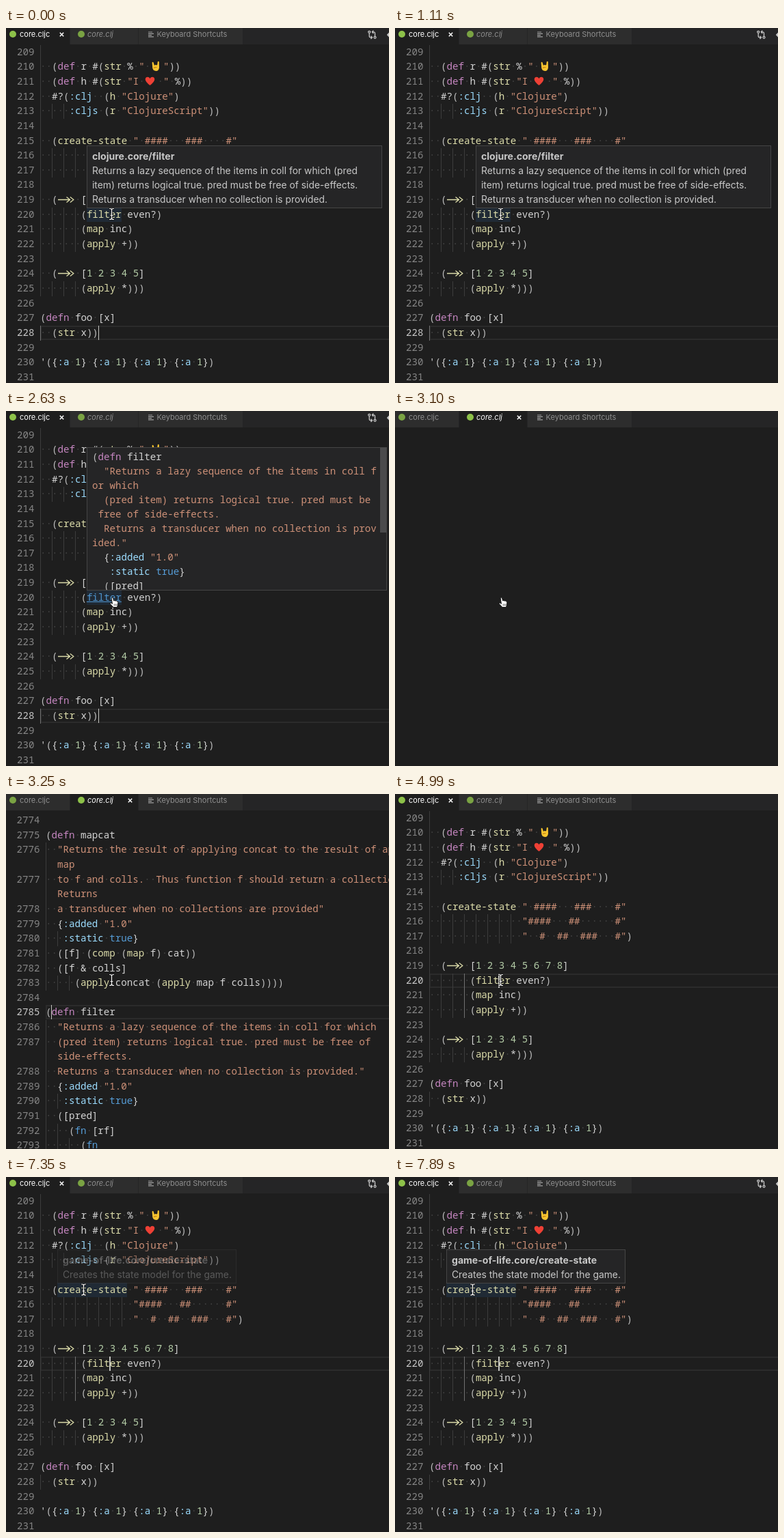
An HTML page for the animation above (8000 ms loop, 560x520 px).

```html
<!DOCTYPE html>
<html lang="en">
<head>
<meta charset="utf-8">
<title>Editor hover and go to definition</title>
<style>
html, body { margin: 0; width: 100%; height: 100%; overflow: hidden; background: #1e1e1e; }
#stage { position: relative; width: 560px; height: 520px; overflow: hidden; background: #1e1e1e; color: #d4d4d4; }
#stage div, #stage svg.abs { position: absolute; box-sizing: border-box; }
.row, .num, .src { white-space: pre; font: 14.15px/21.65px "Noto Sans Mono", monospace; font-variant-ligatures: none; }
.row, .num { height: 21.65px; margin-top: -1px; }
.num { color: #858585; }
.num.on { color: #c6c6c6; }
.row i { font-style: normal; color: #424242; }
.s { color: #ce9178; } .k { color: #9cdcfe; } .d { color: #c586c0; } .f { color: #dcdcaa; }
.n { color: #b5cea8; } .b { color: #569cd6; } .p { color: #bcbcbc; }
.link { color: #4e94ce; text-decoration: underline; }
.guide { width: 1px; height: 21.7px; background: #3c3c3c; }
.guide.on { background: #707070; }
.line { right: -4px; height: 21px; border: 2px solid #2b2b2b; }
.caret { width: 1.2px; height: 21px; background: #c4c4c0; }
.word { height: 21px; background: #202a35; }
.tabs { left: 0; top: 0; width: 560px; height: 24px; background: #252526; }
.tab { top: 0; height: 24px; background: #2d2d2d; color: #8f8f8f; font: 11px/19px Inter, sans-serif; white-space: pre; }
.tab.on { background: #1e1e1e; color: #fff; }
.tab span { position: absolute; left: 20px; top: 0; }
.dot { left: 5px; top: 4px; width: 10px; height: 10px; border-radius: 50%; background: #8dc149; opacity: .8; }
.on .dot { opacity: 1; }
.close { display: none; top: 5.5px; }
.on .close { display: block; }
.tip { overflow: hidden; background: #252526; border: 1px solid #454545; color: #c8c8c8; padding: 4px 7px; font: 13.85px/21px Inter, sans-serif; white-space: pre; }
.tip b { font-size: 14.05px; }
.src { line-height: 21px; color: #d4d4d4; left: 7px; top: 2px; }
.bar { right: 0; top: 0; width: 9px; height: 124px; background: #4b4b4c; }
</style>
</head>
<body>
<div id="stage"></div>
<script>
const CH = 8.49, ROW = 21.65, LOOP = 8000;
const stage = document.getElementById('stage');

const mainSource = `
  (def r #(str % " 🤘"))
  (def h #(str "I ❤ " %))
  #?(:clj  (h "Clojure")
     :cljs (r "ClojureScript"))

  (create-state " ####   ###    #"
                "####   ##      #"
                "  #  ##  ###   #")

  (->> [1 2 3 4 5 6 7 8]
       (filter even?)
       (map inc)
       (apply +))

  (->> [1 2 3 4 5]
       (apply *)))

(defn foo [x]
  (str x))

'({:a 1} {:a 1} {:a 1} {:a 1})
`;

// "~" is the unmarked indent of a soft-wrapped line
const coreSource = `
(defn mapcat
  "Returns the result of applying concat to the result of applying
~~map
  to f and colls.  Thus function f should return a collection.
~~Returns
  a transducer when no collections are provided"
  {:added "1.0"
   :static true}
  ([f] (comp (map f) cat))
  ([f & colls]
     (apply concat (apply map f colls))))

(defn filter
  "Returns a lazy sequence of the items in coll for which
  (pred item) returns logical true. pred must be free of
~~side-effects.
  Returns a transducer when no collection is provided."
  {:added "1.0"
   :static true}
  ([pred]
    (fn [rf]
      (fn`;

const peekSource = `(defn filter
  "Returns a lazy sequence of the items in coll f
or which
  (pred item) returns logical true. pred must be
 free of side-effects.
  Returns a transducer when no collection is prov
ided."
  {:added "1.0"
   :static true}
  ([pred]`;

const inlineSvg = (w, body) =>
  `<svg width="${w}" height="16" viewBox="0 0 ${w} 16" style="vertical-align:-3px">${body}</svg>`;
const glyphs = {
  '->>': inlineSvg(3 * CH, '<path d="M1 8.5H18M13.5 4.500l5 4-5 4M18.800 4.500l5 4-5 4" fill="none" stroke="#dcdcaa" stroke-width="1.3"/>'),
  '🤘': inlineSvg(18.7, '<path d="M2.6 2.4q1-1.4 2 0L6 7l1.3-1.2 1.5.6 1.4-.4.6-4.6q1-1.5 2 0l.2 8.5q-.6 5-4.6 5-4.6 0-5.2-4.6z" fill="#f7c52f"/><path d="M5 10.2l4.5-.7" stroke="#b97b16" stroke-width="1.2"/>'),
  '❤': inlineSvg(18.7, '<path d="M7.5 14Q.7 8.7.7 5.2.8 1.9 4 1.7q2.4 0 3.5 2.4Q8.6 1.7 11 1.7q3.2.2 3.3 3.5 0 3.5-6.8 8.8z" fill="#ee4035"/>')
};

const TOKEN = /("[^"]*")|(:\w+)|(\()([a-z][\w-]*|->>)?|(\))|\b(\d+)\b|\b(true)\b/g;

function paint(cls, text) {
  return text.split('\n').map(part => part && `<span class="${cls}">${part}</span>`).join('\n');
}

function highlight(text) {
  return text.replace(TOKEN, (all, str, key, open, head, close, num, bool) => {
    if (str) return paint('s', str);
    if (key) return paint('k', key);
    if (num) return paint('n', num);
    if (bool) return paint('b', bool);
    if (close) return paint('p', close);
    const cls = /^defn?$/.test(head) ? 'd' : head === 'fn' ? 'b' : 'f';
    return paint('p', open) + (head ? paint(cls, head) : '');
  });
}

const showSpaces = html => html.replace(/<[^>]*>|->>|🤘|❤| /gu, m => m === ' ' ? '<i>·</i>' : glyphs[m] || m);

function add(parent, cls, style = {}, html = '') {
  const el = document.createElement('div');
  el.className = cls;
  for (const [k, v] of Object.entries(style)) el.style[k] = typeof v === 'number' ? v + 'px' : v;
  el.innerHTML = html;
  parent.append(el);
  return el;
}

// Blank lines keep only the guides shared by both neighbours
function guideCount(lines, i) {
  const indent = line => line.search(/[^ \u00a0]/);
  if (lines[i]) return Math.ceil(indent(lines[i]) / 2);
  const above = i ? indent(lines[i - 1]) : 2;
  const below = lines[i + 1] ? indent(lines[i + 1]) : 0;
  return Math.ceil(Math.min(above, below) / 2);
}

function makeEditor(source, first, left, top) {
  const text = source.replaceAll('~', '\u00a0');
  const lines = text.split('\n'), html = highlight(text).split('\n');
  const el = add(stage, 'editor', { left: 0, top: 0, width: 560, height: 520 });
  const y = row => top + row * ROW;
  const line = add(el, 'line', { left });
  const word = add(el, 'word');
  const nums = [], guides = [];
  let number = first;
  lines.forEach((raw, row) => {
    for (let g = 0; g < guideCount(lines, row); g++)
      guides.push({ row, g, el: add(el, 'guide', { left: left + g * 2 * CH, top: y(row) }) });
    if (!raw.startsWith('\u00a0')) {
      const digits = String(number++);
      nums[row] = add(el, 'num', { left: left - (digits.length + 1) * CH, top: y(row) }, digits);
    }
    add(el, 'row', { left, top: y(row) }, showSpaces(html[row]));
  });
  const caret = add(el, 'caret');
  return {
    el,
    find: name => [...el.querySelectorAll('span')].find(s => s.textContent === name),
    setCaret(row, col, visible) {
      line.style.top = caret.style.top = y(row) + 'px';
      caret.style.left = left - 0.4 + col * CH + 'px';
      show(caret, visible);
      nums.forEach((n, i) => n.classList.toggle('on', i === row));
    },
    setGuide(from, to, level) {
      guides.forEach(q => q.el.classList.toggle('on', q.row >= from && q.row <= to && q.g === level));
    },
    setWord(row, col, length) {
      Object.assign(word.style, { top: y(row) + 'px', left: left + col * CH + 'px', width: length * CH + 'px' });
    }
  };
}

const show = (el, on) => { el.style.display = on ? '' : 'none'; };
const inside = (t, spans) => spans.some(([a, b]) => t >= a && t < b);
const stepped = (t, steps) => steps.reduce((value, [at, v]) => t >= at ? v : value, 0);

const main = makeEditor(mainSource, 209, 50, 24.6);
const core = makeEditor(coreSource, 2774, 58, 28);
core.setCaret(13, 1, true);
const link = main.find('filter');

// Tab bar
const bar = add(stage, 'tabs');
const cross = x => `<svg class="abs close" style="left:${x}px" width="7" height="7"><path d="M.8.8l5.4 5.4M6.2.8L.8 6.2" stroke="#fff" stroke-width="1.5"/></svg>`;
const tabMain = add(bar, 'tab', { left: 0, width: 93 }, `<div class="dot"></div><span>core.cljc</span>${cross(78)}`);
const tabCore = add(bar, 'tab', { left: 94, width: 99 }, `<div class="dot" style="left:11px"></div><span style="left:25px;font-style:italic">core.clj</span>${cross(84)}`);
add(bar, 'tab', { left: 194, width: 152 },
  '<svg class="abs" style="left:14px;top:5px" width="9" height="9"><path d="M0 1h6M0 3.3h8M0 5.6h5M0 7.9h8" stroke="#a0a0a0" stroke-width="1.2"/></svg><span style="left:26.5px">Keyboard Shortcuts</span>');
const actions = add(bar, 'actions', { left: 528, top: 3, width: 32, height: 14 },
  `<svg class="abs" width="32" height="14" fill="none" stroke="#c8c8c8" stroke-width="1.3">
   <circle cx="3.2" cy="2.8" r="1.5"/><circle cx="11.5" cy="10.8" r="1.5"/>
   <path d="M3.2 4.5v4.3q0 2 2 2h1.6M5.5 8.6l2 2.2-2 2.2M11.5 9V4.8q0-2-2-2H8M9.3.6l-2 2.2 2 2.2"/>
   <path d="M32 3.5L28.8 7 32 10.5z" fill="#c8c8c8" stroke="none"/></svg>`);

// Hover tips
const docTip = add(stage, 'tip', { left: 118, top: 172, width: 432, height: 92 },
  `<b>clojure.core/filter</b>
Returns a lazy sequence of the items in coll for which (pred
item) returns logical true. pred must be free of side-effects.
Returns a transducer when no collection is provided.`);
const peekTip = add(stage, 'tip', { left: 118, top: 53, width: 439, height: 210 },
  `<div class="src">${highlight(peekSource)}</div><div class="bar"></div>`);
const stateTip = add(stage, 'tip', { left: 75, top: 106, width: 262, height: 50 },
  `<b>game-of-life.core/create-state</b>
Creates the state model for the game.`);

// Pointers
const beam = add(stage, 'beam', { left: -5, top: -10 },
  `<svg class="abs" width="10" height="20" fill="none" stroke-linecap="round">
   ${[['#111', 2.6], ['#fff', 1.2]].map(([c, w]) =>
     `<path d="M2 2q3 0 3 2v12q0 2-3 2M8 2q-3 0-3 2M5 16q0 2 3 2M3.5 12h3" stroke="${c}" stroke-width="${w}"/>`).join('')}</svg>`);
const hand = add(stage, 'hand', { left: 151, top: 272 },
  `<svg class="abs" width="14" height="17"><path d="M3.2 2q1.3-1.5 2.4 0l1 4 1.5-.5 1.2.7 1.3-.2.9.9q1.3-.2 1.4 1.1l-.3 4.2-1.2 3.3H6L1.3 10.6q-.6-1.6 1.2-1.5l1.9 1.3z" fill="#fff" stroke="#111"/><path d="M7.2 10.5v3M9.2 10.5v3M11 10.5v3" stroke="#222" stroke-width=".7"/></svg>`);

const CLICK = 2860, OPEN = 3100, LOADED = 3170, BACK = 4990;
const oldCaret = [[0, 120], [630, 1110], [1650, 2120], [2630, CLICK]];
const newCaret = [[CLICK, OPEN], [BACK, 5470], [6000, 6520], [6930, 7410], [7890, LOOP]];

function pointerAt(t) {
  if (t < 6000) return [154.5, 272.5];
  const u = Math.min(12, Math.floor((t - 6000) / 58.2) + 1) / 12;
  const ease = 1 - (1 - u) ** 3.2;
  const rest = stepped(t, [[0, 1], [6930, .5], [7050, 0]]);
  return [154.5 - 41 * ease + rest, 272.5 - 107.5 * ease + rest];
}

function render(t) {
  const inCore = t >= OPEN && t < BACK;
  const linked = t >= 1710 && t < OPEN;
  tabMain.classList.toggle('on', !inCore);
  tabCore.classList.toggle('on', inCore);
  show(actions, t < OPEN || t >= 5080);
  show(main.el, !inCore);
  show(core.el, inCore && t >= LOADED);

  if (t < CLICK) {
    main.setCaret(19, 10, inside(t, oldCaret));
    main.setGuide(19, 19, 0);
    main.setWord(11, 8, 6);
  } else {
    main.setCaret(11, 12, inside(t, newCaret));
    main.setGuide(11, 13, 3);
    main.setWord(6, 3, t >= 7350 ? 12 : 0);
  }
  link.classList.toggle('link', linked);

  show(docTip, t < 2390);
  peekTip.style.opacity = stepped(t, [[2390, .6], [2450, 1], [CLICK, 0]]);
  stateTip.style.opacity = stepped(t, [[7350, .35], [7410, .8], [7470, 1]]);

  const useHand = t >= 1710 && t < 3250;
  show(hand, useHand);
  show(beam, !useHand);
  const [x, y] = pointerAt(t);
  beam.style.transform = `translate(${x}px, ${y}px)`;
}

const start = performance.now();
function tick(now) {
  render(Math.max(0, now - start) % LOOP);
  requestAnimationFrame(tick);
}
render(0);
requestAnimationFrame(tick);
</script>
</body>
</html>
```
